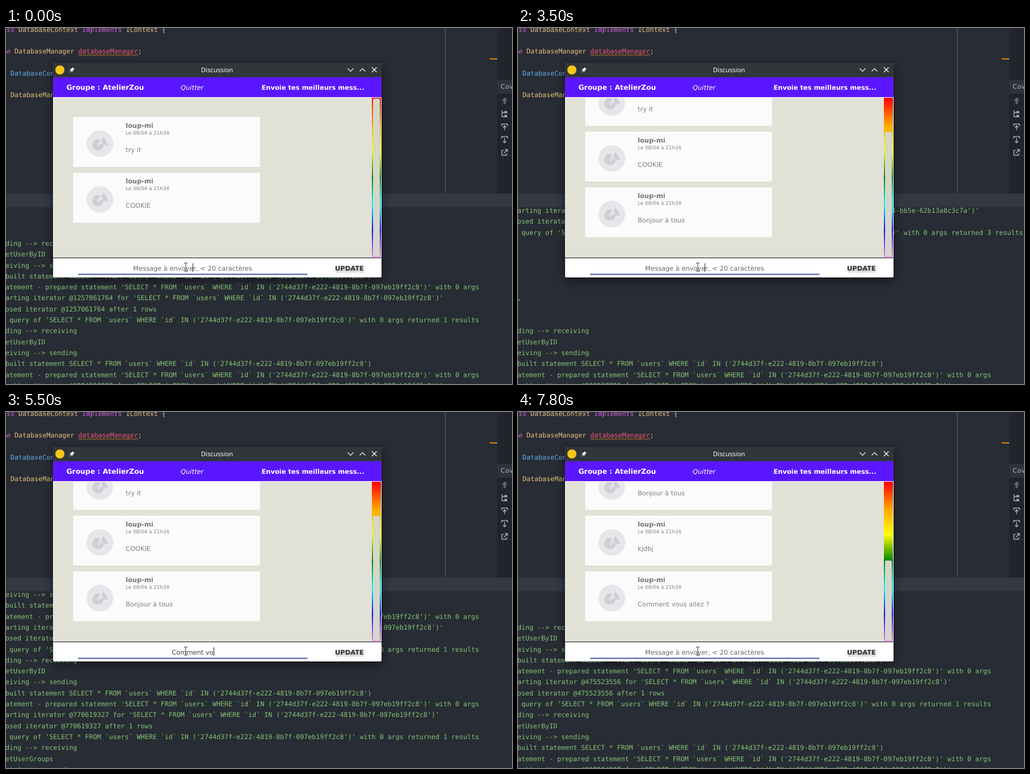
Recreate the animation shown at these times as an HTML page. Size 892 px wide and 628 px high, loop 8000 ms.

```html
<!DOCTYPE html>
<html lang="fr">
<head>
<meta charset="utf-8">
<title>Discussion</title>
<style>
html, body { margin: 0; width: 100%; height: 100%; overflow: hidden; background: #282c34; }
svg { display: block; width: 892px; height: 628px; }
text { white-space: pre; text-rendering: geometricPrecision; font: 11.45px "DejaVu Sans", sans-serif; }
.code text, .log text { font: 11.66px "DejaVu Sans Mono", monospace; }
.log text { fill: #86c476; }
.kw { fill: #d55fde; }
.it { font-style: italic; }
.type { fill: #e5c07b; }
.fn { fill: #61afef; }
.err { fill: #ef596f; }
.plain { fill: #bbbfc7; }
.icon { fill: none; stroke: #a9afb8; stroke-width: 1.4; }
.ctl { fill: none; stroke: #fcfcfc; stroke-width: 1.2; }
text.title { font: 11.3px "Noto Sans", sans-serif; fill: #fcfcfc; text-anchor: middle; }
.head text { fill: #fff; }
text.bold { font-weight: bold; }
text.group { font-size: 12.3px; }
text.name { font-weight: bold; fill: #757575; }
text.date { font-size: 8.75px; fill: #808080; }
text.msg { fill: #828282; }
#field { text-anchor: middle; }
</style>
</head>
<body>
<svg viewBox="0 0 892 628">
  <defs>
    <linearGradient id="rainbow" x2="0" y2="1">
      <stop offset="0" stop-color="red"/>
      <stop offset=".17" stop-color="orange"/>
      <stop offset=".33" stop-color="yellow"/>
      <stop offset=".5" stop-color="green"/>
      <stop offset=".67" stop-color="cyan"/>
      <stop offset=".83" stop-color="blue"/>
      <stop offset="1" stop-color="violet"/>
    </linearGradient>
    <filter id="shade" x="-20%" y="-20%" width="140%" height="140%">
      <feDropShadow dx="0" dy="5" stdDeviation="9" flood-color="#000" flood-opacity=".5"/>
    </filter>
    <filter id="glow" x="-30%" y="-80%" width="160%" height="300%">
      <feDropShadow dx="0" dy="2.5" stdDeviation="2.5" flood-color="#000" flood-opacity=".4"/>
    </filter>
    <clipPath id="consoleClip"><path d="M0 316H892V628H0z"/></clipPath>
    <clipPath id="chatClip"><path d="M84 123H645V405H84z"/></clipPath>
    <g id="card">
      <rect x="118.5" width="329" height="88" fill="#fbfbfb"/>
      <circle cx="165.5" cy="47" r="23.5" fill="#e8e6eb"/>
      <path d="M171.5 34L180.5 49.5H166z" fill="#cfcdd3"/>
      <circle cx="162" cy="49" r="10" fill="#cfcdd3"/>
      <path d="M162 49L166 39.5L171.5 47z" fill="#e8e6eb"/>
      <circle cx="163.5" cy="48.5" r="3.5" fill="#dddbe1"/>
    </g>
  </defs>

  <rect width="892" height="628" fill="#282c34"/>
  <path d="M774.5 0V292" stroke="#5b6069"/>
  <g class="code">
    <text x="1" y="7"><tspan class="kw it">ss </tspan><tspan class="type">DatabaseContext </tspan><tspan class="kw it">implements </tspan><tspan class="type">IContext </tspan><tspan class="plain">{</tspan></text>
    <text x="1" y="45"><tspan class="kw it">e </tspan><tspan class="type">DatabaseManager </tspan><tspan class="err">databaseManager</tspan><tspan class="plain">;</tspan></text>
    <text class="fn" x="8" y="84">DatabaseContext</text>
    <text class="type" x="8" y="122">DatabaseManager</text>
  </g>
  <path id="wave" fill="none" stroke="#d98a1f"/>
  <path d="M853 54.5H866" stroke="#e5891a" stroke-width="2"/>

  <rect x="866" width="26" height="292" fill="#21252b"/>
  <rect x="866" y="91" width="26" height="25" fill="#2d323b"/>
  <text x="872" y="107" fill="#aeb4be">Cov</text>
  <path d="M879 122L884.5 128.5H881V134H877V128.5H873.5z" fill="#5c626c"/>
  <g class="icon">
    <path d="M874.5 145V156.5H878M874.5 149H878"/>
    <path d="M878.5 148.5H883.5M878.5 155.5H883.5" stroke-width="4"/>
    <path d="M874 173V169.5H884V173M879 180V173M876 175.5L879 172.5L882 175.5"/>
    <path d="M874 195V191.5H884V195M879 194V202M876 199.500L879 202.500L882 199.500"/>
    <path d="M877.5 216H874V224.5H882.5V221M877.5 221L883.5 215M879.5 214.5H884V219"/>
  </g>

  <rect y="292" width="892" height="24" fill="#333842"/>
  <g class="log" clip-path="url(#consoleClip)"><g id="log"></g></g>

  <rect x="83" y="62" width="579" height="378" rx="2" fill="#fff" filter="url(#shade)"/>
  <path d="M83 87V64Q83 62 85 62H660Q662 62 662 64V87z" fill="#31363b"/>
  <circle cx="95" cy="74" r="8" fill="#f6c915"/>
  <path d="M117 69L121 73L119.5 73.5L117.5 75.5L117 78L112 73L114.5 72.5L116.5 70.5z" fill="#fcfcfc"/>
  <path d="M114.5 75.5L111.5 78.5" stroke="#fcfcfc"/>
  <text class="title" x="372" y="78">Discussion</text>
  <path class="ctl" d="M602.5 71.5L607.5 76.5L612.5 71.5M623.5 76.5L628.5 71.5L633.5 76.5M645 69.5L653.5 78M653.5 69.5L645 78"/>

  <g class="head">
    <rect x="83" y="87" width="579" height="35" fill="#5a17ff"/>
    <text class="bold group" x="106.5" y="109">Groupe : AtelierZou</text>
    <text class="it" x="308" y="109">Quitter</text>
    <text class="bold" x="450.5" y="109">Envoie tes meilleurs mess...</text>
  </g>

  <rect x="84" y="123" width="577" height="282" fill="#e1e1d6"/>
  <g id="chat" clip-path="url(#chatClip)"></g>
  <rect x="645" y="123" width="16" height="281" fill="url(#rainbow)"/>
  <rect id="thumb" x="647" width="12" rx="2" fill="#d6d6ca"/>
  <path d="M83 405.5H662" stroke="#111"/>

  <path d="M127 434.5H531.5" stroke="#4059a9" stroke-width="2"/>
  <text id="field" x="329" y="427.5"></text>
  <rect id="caret" y="415" width="1" height="15" fill="#222"/>
  <text class="bold" x="580" y="427.5" fill="#303030" filter="url(#glow)">UPDATE</text>
  <path d="M314 414.5H316.2L317 415.5L317.8 414.5H320M317 415V428.5M314 429H316.2L317 428L317.8 429H320" fill="none" stroke="#333"/>
</svg>

<script>
const LOOP = 8000, ROW = 19.31, MID = 329;
const $ = id => document.getElementById(id);

function add(parent, tag, attrs, content = "") {
  const node = document.createElementNS("http://www.w3.org/2000/svg", tag);
  for (const key in attrs) node.setAttribute(key, attrs[key]);
  node.textContent = content;
  return parent.appendChild(node);
}

// Console lines, cut at the left edge of the stage
const member = "afa16ad5-fbef-4b15-987a-2c5a54579778";
const byId = "SELECT * FROM `users` WHERE `id` IN ('2744d37f-e222-4819-8b7f-097eb19ff2c8')";
const byMember = `SELECT * FROM \`users\` WHERE \`id\` = '${member}'`;
const groups = `SELECT * FROM \`groups\` WHERE \`members\` LIKE '%${member}%'`;
const messages = "SELECT * FROM `messages` WHERE `groupid` IN ('7c1e90b2-53da-4f04-bb5e-62b13a8c3c7a')";

const query = (sql, iter, n = 1) => [
  `built statement ${sql}`,
  `atement - prepared statement '${sql}' with 0 args`,
  `arting iterator @${iter} for '${sql}'`,
  `osed iterator @${iter} after ${n} rows`,
  ` query of '${sql}' with 0 args returned ${n} results`
];
const request = (name, sql, iter) =>
  ["ding --> receiving", name, "eiving --> sending", ...query(sql, iter)];
const user = iter => request("etUserByID", byId, iter);
const blank = n => Array(n).fill("");

const logs = [
  [...blank(3), ...user(1257061764), ...user(1254050257)],
  [...query(messages, 52713846, 3).slice(2), ...blank(5), ",", ...blank(2),
    ...user(380267798), ...user(1604418253), ...user(770619327),
    ...request("etUserGroups", byMember, 1300444837), ...query(groups, 2105773828)],
  [...blank(3), ...user(475523556), ...user(817284367)]
];

// [start, log, first row]
const scrolls = [
  [0, 0, 0], [3500, 1, 0],
  [4700, 1, .6], [4800, 1, 1.2], [4900, 1, 1.78], [5000, 1, 5], [5100, 1, 9], [5200, 1, 13], [5300, 1, 17],
  ...Array.from({ length: 9 }, (_, i) => [5500 + i * 100, 1, 21 + i]),
  [7400, 2, -.5], [7500, 2, 0]
];

// [start, first card top, thumb top, messages]
const chats = [
  [0, 157, 124.5, ["try it", "COOKIE"]],
  [3500, 84.5, 183, ["try it", "COOKIE", "Bonjour à tous"]],
  [7400, 84.5, 262, ["Bonjour à tous", "kjdbj", "Comment vous allez ?"]]
];

// Typing: [start, length of the phrase shown]
const type = (phrase, steps) => steps.map(([at, n]) => [at, phrase.slice(0, n), true]);
const inputs = [
  [0, "", true], [300, "", false], [1000, "", true],
  ...type("Bonjour à tous", [[1100, 1], [1300, 2], [1400, 3], [1600, 4], [1700, 6], [1800, 7], [1900, 9],
    [2100, 10], [2200, 11], [2300, 12], [2400, 13], [2500, 14]]),
  [3500, "", true], [3800, "", false],
  ...type("Comment vous allez ?", [[4100, 1], [4400, 2], [4700, 3], [4800, 4], [4900, 5], [5000, 6], [5100, 7],
    [5200, 8], [5300, 9], [5500, 10], [5600, 11], [5800, 12], [5900, 13], [6000, 14], [6100, 15], [6200, 16],
    [6300, 17], [6400, 18], [6700, 19], [6900, 20]]),
  [7400, "", true], [7800, "", false]
];

function drawLog([, index, top]) {
  $("log").replaceChildren();
  logs[index].forEach((line, i) => {
    const y = 326 + (i - top) * ROW;
    if (line && y > 305 && y < 645) add($("log"), "text", { x: -1, y }, line);
  });
}

function drawChat([, top, thumb, list]) {
  $("chat").replaceChildren();
  list.forEach((message, i) => {
    const g = add($("chat"), "g", { transform: `translate(0 ${top + i * 98.4})` });
    add(g, "use", { href: "#card" });
    add(g, "text", { class: "name", x: 211, y: 18.7 }, "loup-mi");
    add(g, "text", { class: "date", x: 211, y: 31 }, "Le 08/04 à 21h34");
    add(g, "text", { class: "msg", x: 211, y: 62 }, message);
  });
  $("thumb").setAttribute("y", thumb);
  $("thumb").setAttribute("height", 403 - thumb);
}

function drawInput([, value, caret]) {
  const field = $("field");
  field.textContent = value || "Message à envoyer, < 20 caractères";
  field.setAttribute("fill", value ? "#444" : "#666");
  const half = value ? field.getComputedTextLength() / 2 : 0;
  $("caret").setAttribute("x", Math.round(MID + half));
  $("caret").setAttribute("visibility", caret ? "visible" : "hidden");
}

const tracks = [[scrolls, drawLog], [chats, drawChat], [inputs, drawInput]];
const shown = [];

function frame() {
  const t = performance.now() % LOOP;
  tracks.forEach(([states, draw], i) => {
    const state = states.findLast(s => s[0] <= t);
    if (shown[i] !== state) draw(shown[i] = state);
  });
  requestAnimationFrame(frame);
}

$("wave").setAttribute("d", "M127.5 49" + "l2.5 -2.5l2.5 2.5".repeat(21));
frame();
</script>
</body>
</html>
```
